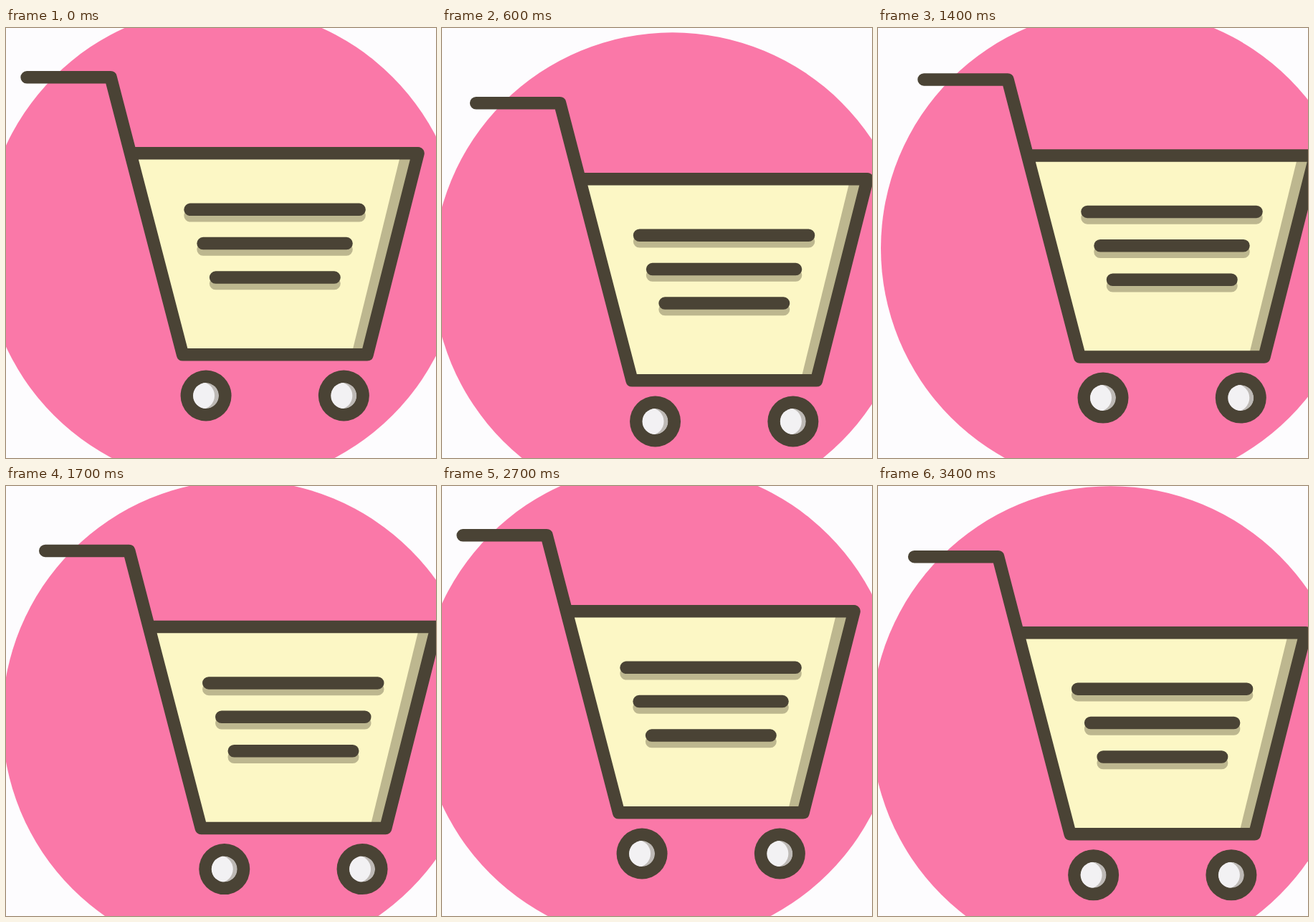
These frames come from a looping animation (600x600 px, 3.5 s). An HTML page:

```html
<!DOCTYPE html>
<html lang="en">
<head>
<meta charset="utf-8">
<title>Shopping cart</title>
<style>
  html, body { margin: 0; width: 100%; height: 100%; overflow: hidden; background: #fdfcfe; }
  svg { display: block; width: 100vw; height: 100vh; }
  .ink { fill: none; stroke: #4a4335; stroke-width: 17.5; stroke-linecap: round; stroke-linejoin: round; }
  .shade { stroke: #bdb78f; }
</style>
</head>
<body>
<svg viewBox="0 0 600 600">
  <defs>
    <clipPath id="hub"><circle r="18"/></clipPath>
    <g id="wheel">
      <circle r="35.5" fill="#4a4335"/>
      <g clip-path="url(#hub)">
        <circle r="18" fill="#bdb9b5"/>
        <circle cx="-7" r="19" fill="#f2f1f3"/>
      </g>
    </g>
    <path id="bars" d="M257 253H493M275 300.3H475M292.5 347.8H458"/>
  </defs>
  <g id="scene">
    <circle cx="303" cy="304" r="334" fill="#fa78a8"/>
    <path d="M174 174.5H575L504 455.5H247Z" fill="#fcf7c5"/>
    <path d="M551 174.5H575L504 455.5H482Z" fill="#bdb78f"/>
    <use href="#bars" class="ink shade" y="8.5"/>
    <use href="#bars" class="ink"/>
    <path class="ink" d="M29 68.5H146L246.5 455.5H504L575 174.5H174"/>
    <use href="#wheel" x="279" y="512.7"/>
    <use href="#wheel" x="471.3" y="512.7"/>
  </g>
</svg>
<script>
  const LOOP = 3500, STEP = 100;
  const SWING = 2700, LEAD = 83, SPAN = 41.6;
  const scene = document.getElementById('scene');

  // Triangle wave: 0 to 1 and back over one period
  const bounce = (t, period) => {
    const p = (t % period) / period;
    return 1 - Math.abs(1 - 2 * p);
  };

  // The scene bounces inside a square, twice as fast vertically
  function draw(now) {
    const t = Math.floor((now % LOOP) / STEP) * STEP + LEAD;
    const x = SPAN * bounce(t, SWING) - 2.5;
    const y = SPAN * bounce(t, SWING / 2) - 4.8;
    scene.setAttribute('transform', `translate(${x.toFixed(2)} ${y.toFixed(2)})`);
  }

  const start = performance.now();
  function tick() {
    draw(performance.now() - start);
    requestAnimationFrame(tick);
  }
  tick();
</script>
</body>
</html>
```
